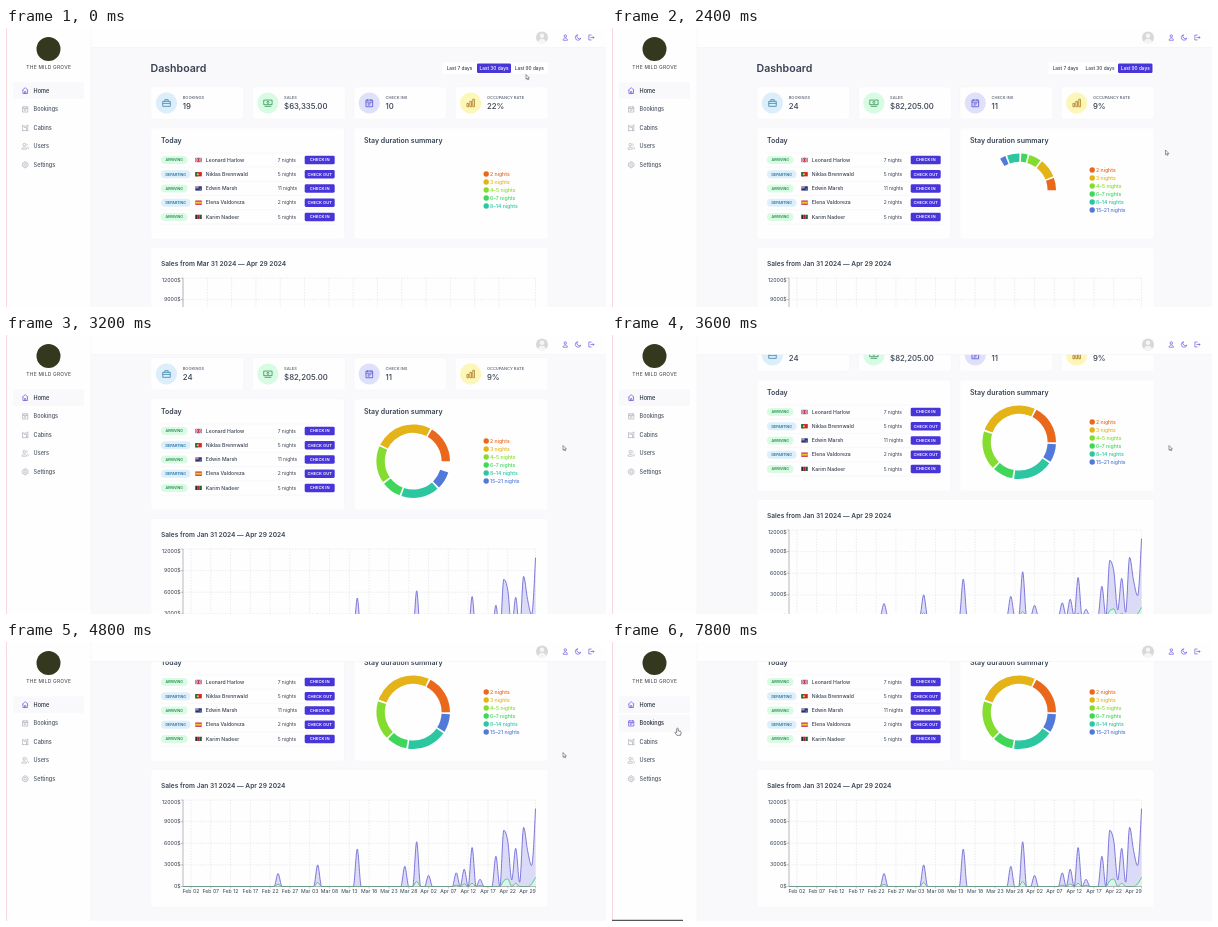
An HTML page with a canvas for the animation above (8000 ms loop, 600 px wide and 279 px high).

```html
<!DOCTYPE html>
<html lang="en">
<head>
<meta charset="utf-8">
<title>Dashboard</title>
<style>
html, body { margin: 0; width: 100%; height: 100%; overflow: hidden; background: #f9f8fb; }
canvas { display: block; width: 100vw; height: 100vh; }
</style>
</head>
<body>
<canvas id="stage"></canvas>
<script>
const W = 600, H = 279, LOOP = 8000, STEP = 200;
const CLICK = 1270, LOADED = 1690;
const BRAND = '#4835d9', INK = '#374151', MUTED = '#6b7280', GRID = '#e3e3e8', AXIS = '#8c8c90';
const canvas = document.getElementById('stage');
const dpr = window.devicePixelRatio || 1;
canvas.width = W * dpr;
canvas.height = H * dpr;
const ctx = canvas.getContext('2d');

const ICONS = {
  home: 'M3 11 12 3l9 8M5 9.5V21h14V9.5M10 21v-6h4v6',
  calendar: 'M4 5h16v16H4zM4 10h16M8 3v4M16 3v4M8 14h8M8 17h5',
  cabin: 'M4 3v18M4 7h13l3-4v18M8 11h8v10M2 21h20',
  users: 'M9 11a4 4 0 1 0 0-8a4 4 0 0 0 0 8M2 21c0-9 14-9 14 0zM16 4a4 4 0 0 1 0 7M18 14c3 1 4 3 4 7',
  gear: 'M9 3h6l1 3 4 1 1 5-1 5-4 1-1 3H9l-1-3-4-1-1-5 1-5 4-1zM12 8a4 4 0 1 0 0 8a4 4 0 0 0 0-8',
  user: 'M12 11a4 4 0 1 0 0-8a4 4 0 0 0 0 8M5 21c0-10 14-10 14 0z',
  moon: 'M20 14A9 9 0 1 1 10 3a7 7 0 0 0 10 11z',
  exit: 'M13 4H4v16h9M9 12h12M17 8l4 4-4 4',
  bag: 'M3 8h18v12H3zM8 8V4h8v4M3 13h18',
  cash: 'M2 5h20v11H2zM12 8a2.500 2.500 0 1 0 0 5a2.500 2.500 0 0 0 0-5M4 20h16',
  bars: 'M3 13h4v8H3zM10 8h4v13h-4zM17 3h4v18h-4z'
};
for (const key in ICONS) ICONS[key] = new Path2D(ICONS[key]);

const NAV = [['home', 'Home'], ['calendar', 'Bookings'], ['cabin', 'Cabins'], ['users', 'Users'], ['gear', 'Settings']];
const STATS = [
  ['BOOKINGS', 'bag', '#dbeefa', '#2f7fa8'],
  ['SALES', 'cash', '#d8fbe4', '#2c8c50'],
  ['CHECK INS', 'calendar', '#dfe1fb', '#4f45cc'],
  ['OCCUPANCY RATE', 'bars', '#fcf7b8', '#a8701c']
];
const GUESTS = [
  ['Leonard Harlow', 7, 'gb'],
  ['Niklas Brennwald', 5, 'pt'],
  ['Edwin Marsh', 11, 'au'],
  ['Elena Valdoreza', 2, 'es'],
  ['Karim Nadeer', 5, 'af']
];
const STAYS = [
  ['2 nights', '#ea681c'], ['3 nights', '#e3b318'], ['4–5 nights', '#84dd2e'],
  ['6–7 nights', '#3fd65a'], ['8–14 nights', '#2cc6a0'], ['15–21 nights', '#5079da']
];
const PERIODS = {
  month: { title: 'Sales from Mar 31 2024 — Apr 29 2024', stats: ['19', '$63,335.00', '10', '22%'],
    angles: [60, 90, 80, 45, 70], days: 30, firstTick: 0, tickStep: 2, mounted: -250 },
  quarter: { title: 'Sales from Jan 31 2024 — Apr 29 2024', stats: ['24', '$82,205.00', '11', '9%'],
    angles: [62, 95, 61, 32, 63, 29], days: 90, firstTick: 2, tickStep: 5, mounted: LOADED }
};

// Day index -> amount; every other day is zero.
const TOTAL = { 24: 1800, 34: 3000, 44: 5200, 56: 2800, 59: 6200, 62: 1550, 69: 1900, 71: 2400, 73: 5400,
  75: 1000, 79: 4200, 81: 7800, 82: 6300, 83: 900, 84: 5300, 85: 600, 86: 8200, 87: 5000, 88: 2900, 89: 10800 };
const EXTRAS = { 24: 300, 34: 550, 59: 700, 69: 200, 71: 350, 73: 450, 75: 150, 81: 800, 82: 1050,
  84: 450, 88: 350, 89: 1250 };

const SCROLL = [[2600, 0], [3200, 36], [4000, 74], [4400, 92]];
const POINTER = [[200, 520, 46.5], [800, 524, 42.5], [1600, 525.5, 44], [1800, 530, 56], [2400, 553.5, 122],
  [3200, 557, 110.5], [5000, 557, 110.5], [6200, 160.5, 81], [6600, 150, 82], [7200, 104, 89],
  [7400, 76, 90], [7800, 65.500, 86]];
const FADE_30 = [[CLICK - 70, 1], [1400, 0.75], [1600, 0]];
const FADE_90 = [[400, 0], [800, 1]];

function along(keys, t) {
  if (t <= keys[0][0]) return keys[0].slice(1);
  for (let i = 1; i < keys.length; i++) {
    const a = keys[i - 1], b = keys[i];
    if (t <= b[0]) {
      const k = (t - a[0]) / (b[0] - a[0]);
      return a.slice(1).map((v, j) => v + (b[j + 1] - v) * k);
    }
  }
  return keys[keys.length - 1].slice(1);
}

// cubic-bezier(.25, .1, .25, 1)
function ease(x) {
  if (x <= 0) return 0;
  if (x >= 1) return 1;
  const curve = (u, a, b) => 3 * u * (1 - u) ** 2 * a + 3 * u * u * (1 - u) * b + u ** 3;
  let lo = 0, hi = 1;
  for (let i = 0; i < 24; i++) {
    const mid = (lo + hi) / 2;
    if (curve(mid, 0.25, 0.25) < x) lo = mid; else hi = mid;
  }
  return curve(lo, 0.1, 1);
}

function box(x, y, w, h, color, r = 0) {
  ctx.fillStyle = color;
  ctx.beginPath();
  ctx.roundRect(x, y, w, h, r);
  ctx.fill();
}

function disc(x, y, r, color) {
  ctx.fillStyle = color;
  ctx.beginPath();
  ctx.arc(x, y, r, 0, Math.PI * 2);
  ctx.fill();
}

function line(x1, y1, x2, y2, color, width = 0.5) {
  ctx.strokeStyle = color;
  ctx.lineWidth = width;
  ctx.beginPath();
  ctx.moveTo(x1, y1);
  ctx.lineTo(x2, y2);
  ctx.stroke();
}

// y is the middle of the capitals
function say(str, x, y, size, color = INK, weight = 500, align = 'left') {
  ctx.font = `${weight} ${size}px Inter, "Open Sans", sans-serif`;
  ctx.fillStyle = color;
  ctx.textAlign = align;
  ctx.fillText(str, x, y + size * 0.36);
}

function icon(name, cx, cy, size, color) {
  ctx.save();
  ctx.translate(cx - size / 2, cy - size / 2);
  ctx.scale(size / 24, size / 24);
  ctx.strokeStyle = color;
  ctx.lineWidth = 1.8;
  ctx.lineJoin = 'round';
  ctx.stroke(ICONS[name]);
  ctx.restore();
}

function flag(kind, x, y) {
  const w = 6.5, h = 4.3;
  if (kind === 'es') {
    box(x, y, w, h, '#c8202f');
    box(x, y + h / 4, w, h / 2, '#f2c230');
  } else if (kind === 'af') {
    ['#2a2a2a', '#a8202f', '#2a5a35'].forEach((color, i) => box(x + i * w / 3, y, w / 3, h, color));
  } else if (kind === 'pt') {
    box(x, y, w, h, '#d8202c');
    box(x, y, w * 0.4, h, '#1b7a3a');
    disc(x + w * 0.4, y + h / 2, 1, '#f2d040');
  } else {
    box(x, y, w, h, '#23307a');
    const k = kind === 'gb' ? 1 : 0.5;
    line(x, y, x + w * k, y + h * k, '#ffffff', 0.8 * k);
    line(x, y + h * k, x + w * k, y, '#ffffff', 0.8 * k);
    for (const [color, size] of [['#ffffff', 1.6], ['#d0202f', 0.9]]) {
      line(x + w * k / 2, y, x + w * k / 2, y + h * k, color, size * k);
      line(x, y + h * k / 2, x + w * k, y + h * k / 2, color, size * k);
    }
    if (k < 1) disc(x + 4.8, y + 2.6, 0.5, '#ffffff');
  }
}

function period(label, x, w, fill) {
  if (fill > 0) {
    ctx.globalAlpha = fill;
    box(x, 35.5, w, 9.6, BRAND, 1.3);
    ctx.globalAlpha = 1;
  }
  const color = fill > 0.9 ? '#ffffff' : fill > 0.4 ? '#d3cdf7' : INK;
  say(label, x + w / 2, 40.3, 4.75, color, 500, 'center');
}

function heading(t) {
  say('Dashboard', 144.5, 40.2, 10.6, INK, 600);
  box(436.5, 34.5, 105.5, 11.6, '#ffffff', 1.5);
  period('Last 7 days', 437.5, 32, 0);
  period('Last 30 days', 471, 34, along(FADE_30, t)[0]);
  period('Last 90 days', 506, 34.5, along(FADE_90, t)[0]);
}

function card(x, y, w, h) {
  box(x, y, w, h, '#fefefe', 2);
  ctx.strokeStyle = '#f3f3f6';
  ctx.lineWidth = 0.4;
  ctx.stroke();
}

function stats(values) {
  STATS.forEach(([label, name, tint, color], i) => {
    const x = 145 + i * 101.4;
    card(x, 59, 92.8, 32);
    disc(x + 15.5, 75, 10.6, tint);
    icon(name, x + 15.5, 75, 10, color);
    say(label, x + 31.7, 69.6, 4, MUTED, 600);
    say(values[i], x + 31.7, 77.8, 7.8, INK, 500);
  });
}

function today() {
  card(145, 100, 193.5, 111);
  say('Today', 155, 112, 7, INK, 600);
  line(155, 125, 329, 125, '#f1f1f4');
  GUESTS.forEach(([name, nights, country], i) => {
    const y = 132 + i * 14.22, leaving = i % 2 === 1;
    const w = leaving ? 29.5 : 26.5;
    box(155, y - 4, w, 8, leaving ? '#dceffb' : '#d9fbe4', 4);
    say(leaving ? 'DEPARTING' : 'ARRIVING', 155 + w / 2, y, 3.6, leaving ? '#1f6f9f' : '#1f8548', 600, 'center');
    flag(country, 189.3, y - 2.15);
    say(name, 199.8, y, 5.1);
    say(nights + ' nights', 271.7, y, 4.9, INK, 400);
    box(298.7, y - 4.2, 30, 8.5, BRAND, 1.4);
    say(leaving ? 'CHECK OUT' : 'CHECK IN', 313.7, y, 4.1, '#ffffff', 600, 'center');
    line(155, y + 7.1, 329, y + 7.1, '#f1f1f4');
  });
}

function stays(angles, progress) {
  card(348, 100, 194, 111);
  say('Stay duration summary', 358, 112, 7, INK, 600);
  const rad = Math.PI / 180, top = 162 - (angles.length - 1) * 4;
  let from = 0;
  angles.forEach((size, i) => {
    const [label, color] = STAYS[i];
    disc(480.2, top + i * 8, 2.7, color);
    say(label, 484, top + i * 8, 5.15, color, 500);
    if (progress <= 0) return;
    const to = from + size * progress;
    ctx.fillStyle = color;
    ctx.beginPath();
    ctx.arc(407.2, 162.2, 36.8, -from * rad, -to * rad, true);
    ctx.arc(407.2, 162.2, 28.4, -to * rad, -from * rad, false);
    ctx.fill();
    from = to + 3;
  });
}

const LEFT = 177, RIGHT = 529.5, ZERO = 336.5, TOP = 250;

// Monotone cubic through the daily amounts
function trace(amounts, days) {
  const dx = (RIGHT - LEFT) / (days - 1);
  const ys = Array.from({ length: days }, (_, i) =>
    ZERO - (amounts[90 - days + i] || 0) / 12000 * (ZERO - TOP));
  const slope = ys.map((y, i) => {
    if (i === 0 || i === days - 1) return 0;
    const a = (y - ys[i - 1]) / dx, b = (ys[i + 1] - y) / dx;
    return a * b <= 0 ? 0 : Math.sign(a) * Math.min(2 * Math.abs(a), 2 * Math.abs(b), Math.abs(a + b) / 2);
  });
  // The last day leaves with the slope it needs, without flattening
  slope[days - 1] = 1.5 * (ys[days - 1] - ys[days - 2]) / dx - slope[days - 2] / 2;
  const path = new Path2D();
  path.moveTo(LEFT, ys[0]);
  for (let i = 1; i < days; i++) {
    const x = LEFT + i * dx;
    path.bezierCurveTo(x - dx * 2 / 3, ys[i - 1] + slope[i - 1] * dx / 3,
      x - dx / 3, ys[i] - slope[i] * dx / 3, x, ys[i]);
  }
  return path;
}

function area(amounts, days, stroke, fill) {
  const path = trace(amounts, days), closed = new Path2D(path);
  closed.lineTo(RIGHT, ZERO);
  closed.lineTo(LEFT, ZERO);
  ctx.globalAlpha = 0.75;
  ctx.fillStyle = fill;
  ctx.fill(closed);
  ctx.globalAlpha = 1;
  ctx.strokeStyle = stroke;
  ctx.lineWidth = 0.8;
  ctx.stroke(path);
}

function sales({ title, days, firstTick, tickStep }, progress) {
  card(145, 219.5, 397, 137.5);
  say(title, 155, 235.5, 6.6, INK, 600);
  const dx = (RIGHT - LEFT) / (days - 1);
  const ticks = [];
  for (let i = firstTick; i < days - tickStep; i += tickStep) ticks.push(i);
  ticks.push(days - 1);

  ctx.setLineDash([1.4, 1.4]);
  for (let i = 0; i <= 4; i++) {
    const y = ZERO - i * (ZERO - TOP) / 4;
    line(LEFT, y, RIGHT, y, GRID, 0.7);
  }
  ticks.forEach(i => line(LEFT + i * dx, TOP, LEFT + i * dx, ZERO, GRID, 0.7));
  ctx.setLineDash([]);

  ctx.save();
  ctx.beginPath();
  ctx.rect(LEFT, TOP - 5, (RIGHT - LEFT) * progress + (progress >= 1 ? 2 : 0), ZERO - TOP + 10);
  ctx.clip();
  area(TOTAL, days, '#625ad2', '#cfcff4');
  area(EXTRAS, days, '#2fc466', '#dcfce7');
  ctx.restore();

  line(LEFT, TOP, LEFT, ZERO, AXIS, 0.6);
  line(LEFT, ZERO, RIGHT, ZERO, AXIS, 0.6);
  for (let i = 0; i <= 4; i++) {
    const y = ZERO - i * (ZERO - TOP) / 4;
    line(LEFT - 2, y, LEFT, y, AXIS);
    say(i * 3000 + '$', 174.7, i === 4 ? y + 2.4 : y - 0.3, 5.3, INK, 400, 'right');
  }
  ticks.forEach(i => {
    const x = LEFT + i * dx, day = new Date(Date.UTC(2024, 3, 30 - days + i));
    const label = day.toLocaleDateString('en-US', { month: 'short', day: '2-digit', timeZone: 'UTC' });
    line(x, ZERO, x, ZERO + 2, AXIS);
    say(label, Math.min(x, 521.5), ZERO + 4.8, 5.2, INK, 400, 'center');
  });
}

function spinner(t) {
  const turn = (15 + (t - 1400) * 360 / 1500 - 90) * Math.PI / 180;
  const paint = ctx.createConicGradient(turn, 343.3, 84.5);
  paint.addColorStop(0, 'rgba(72,53,217,0)');
  paint.addColorStop(0.1, 'rgba(72,53,217,0)');
  paint.addColorStop(1, BRAND);
  ctx.strokeStyle = paint;
  ctx.lineWidth = 2.9;
  ctx.beginPath();
  ctx.arc(343.3, 84.5, 9.1, 0, Math.PI * 2);
  ctx.stroke();
}

function topBar() {
  box(85, 0, 515, 19.5, '#fefefe');
  line(85, 19.5, W, 19.5, '#f1f1f4');
  ctx.save();
  ctx.beginPath();
  ctx.arc(536, 9.5, 6, 0, Math.PI * 2);
  ctx.clip();
  box(530, 3, 12, 13, '#d6d9d7');
  disc(536, 7.8, 2.3, '#f4f5f4');
  disc(536, 15, 4.3, '#f4f5f4');
  ctx.restore();
  ['user', 'moon', 'exit'].forEach((name, i) => icon(name, 559.3 + i * 13, 9.5, 7.4, BRAND));
}

function sideBar(hover) {
  box(0, 0, 85, H, '#fefefe');
  line(85, 0, 85, H, '#f1f1f4');
  box(0, 0, 0.9, H, '#f8d3da');
  disc(42.5, 21, 12, '#34381f');
  ctx.letterSpacing = '0.25px';
  say('THE MILD GROVE', 42.7, 39.6, 4.9, '#55585e', 500, 'center');
  ctx.letterSpacing = '0px';
  NAV.forEach(([name, label], i) => {
    const y = 62.6 + i * 18.55, lit = i === 0 || (i === 1 && hover);
    if (lit) box(7, y - 8.3, 71, 16.6, '#f9f9fb', 1.5);
    icon(name, 19.2, y, 7.8, lit ? BRAND : '#9ca3af');
    say(label, 27.6, y, 5.5, lit ? '#1f2937' : '#4b5563', 500);
  });
}

function pointer(kind, x, y) {
  ctx.save();
  ctx.translate(x, y);
  if (kind === 'blocked') {
    disc(0, 0, 2.6, '#c8202f');
    disc(0, 0, 1.5, '#ffffff');
    line(-1.3, -1.3, 1.3, 1.3, '#c8202f', 0.9);
  } else {
    if (kind === 'arrow') ctx.scale(0.85, 0.85);
    const shape = new Path2D(kind === 'hand'
      ? 'M-.8 .6Q0-.4.8.6V3L3 3.400Q3.800 3.600 3.600 5L3 7.300H-.6L-2.600 4.600Q-2.400 3.500-.8 4.600Z'
      : 'M0 0V5.600L1.300 4.400 2.200 6.400 3.100 6 2.200 4.100H4Z');
    ctx.fillStyle = '#ffffff';
    ctx.fill(shape);
    ctx.strokeStyle = '#3a3a3e';
    ctx.lineWidth = 0.6;
    ctx.stroke(shape);
  }
  ctx.restore();
}

function draw(t) {
  ctx.setTransform(dpr, 0, 0, dpr, 0, 0);
  box(0, 0, W, H, '#f9f8fb');

  const loading = t > CLICK && t < LOADED;
  ctx.save();
  ctx.translate(0, -along(SCROLL, t)[0]);
  heading(t);
  if (loading) {
    spinner(t);
  } else {
    const view = t < CLICK ? PERIODS.month : PERIODS.quarter;
    const age = t - view.mounted;
    stats(view.stats);
    today();
    stays(view.angles, ease((age - 400) / 1500));
    sales(view, ease(age / 1500));
  }
  ctx.restore();

  const [x, y] = along(POINTER, t);
  const onLink = t >= 7400 && x < 78;
  topBar();
  sideBar(onLink);
  if (onLink) box(0, 277.8, 71, 1.2, '#55565a');
  pointer(onLink ? 'hand' : loading ? 'blocked' : 'arrow', x, y);
}

const start = performance.now();
function tick() {
  const t = (performance.now() - start) % LOOP;
  draw(Math.floor(t / STEP) * STEP);
  requestAnimationFrame(tick);
}
tick();
</script>
</body>
</html>
```
